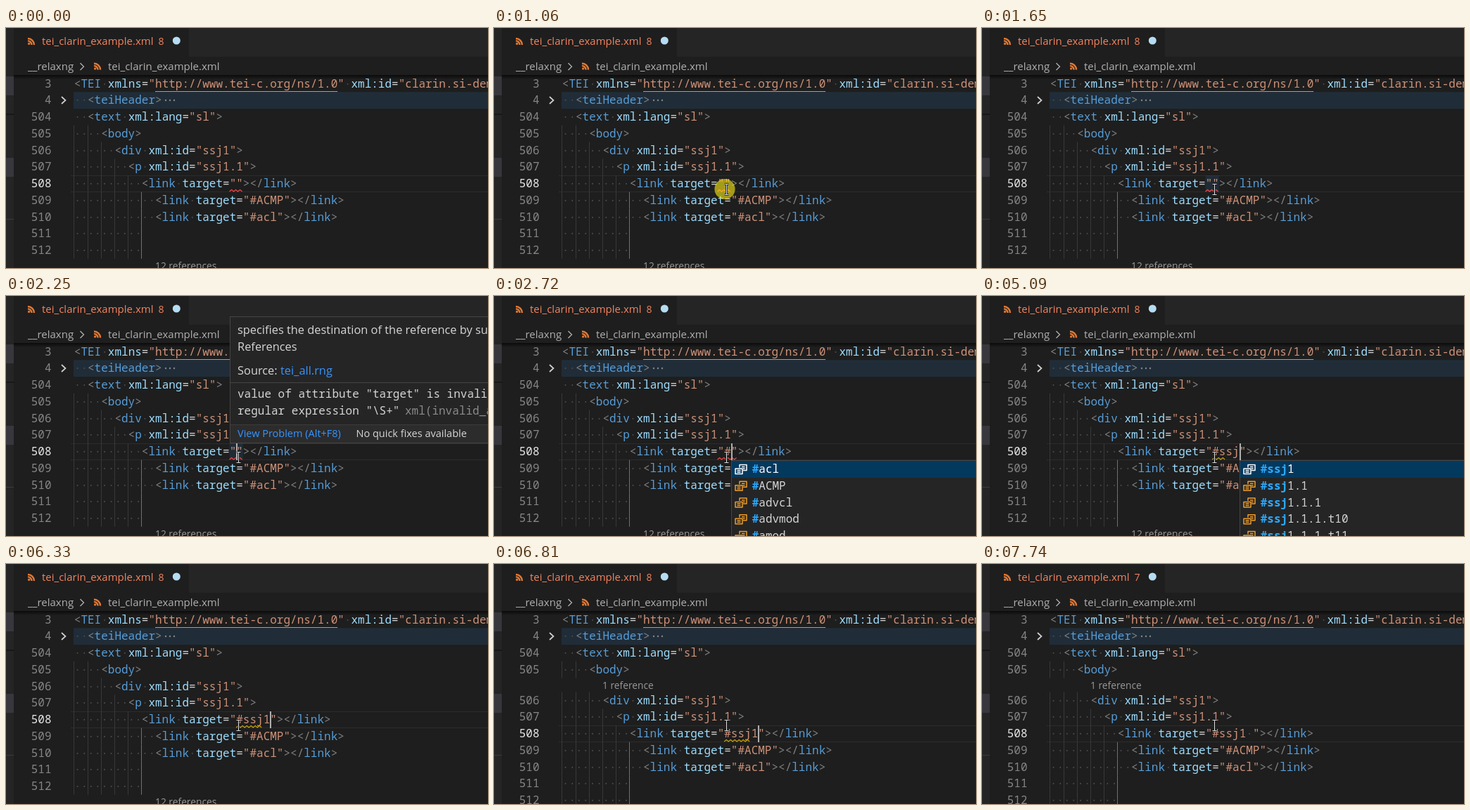
These frames come from a looping animation (685x342 px, 8000 ms). An HTML page:

```html
<!DOCTYPE html>
<html lang="en">
<head>
<meta charset="utf-8">
<title>XML editor</title>
<style>
  html, body { margin: 0; width: 100%; height: 100%; overflow: hidden; background: #1e1e1e; }
  svg { display: block; width: 685px; height: 342px; }
  .code { font: 500 16px "Noto Sans Mono", monospace; fill: #d4d4d4; }
  .ui { font: 15px "Open Sans", sans-serif; fill: #b0b0b0; }
  .doc { font-size: 16.4px; fill: #d6d6d6; }
  .bar { font-size: 14.5px; fill: #d6d6d6; }
  .lens { font-size: 13.8px; fill: #999; }
  .num { text-anchor: end; fill: #858585; }
  .match { fill: #2aaaff; font-weight: 700; }
  .link { fill: #3794ff; }
  .title { fill: #f4845f; }
</style>
</head>
<body>
<svg viewBox="0 0 685 342">
  <defs>
    <linearGradient id="shade" x2="0" y2="1">
      <stop stop-color="#000" stop-opacity=".65"/>
      <stop offset="1" stop-color="#000" stop-opacity="0"/>
    </linearGradient>
    <g id="feed" fill="none" stroke="#e37933" stroke-width="2.4">
      <circle cx="1.6" cy="8.4" r="1.6" fill="#e37933" stroke="none"/>
      <path d="M0 4.4a5.6 5.6 0 0 1 5.6 5.6M0 1a9 9 0 0 1 9 9"/>
    </g>
    <g id="member" fill="none" stroke-width="1.5" stroke-linejoin="round">
      <path d="M7 5V1h10v8h-5M10 4h4.500M12 6.500h2.500"/>
      <path d="M1 6.500h10v7.500h-10zM3.500 9h5M3.500 11.500h5"/>
    </g>
  </defs>

  <rect width="11" height="342" fill="#252526"/>
  <rect y="69" width="11" height="27" fill="#37373d"/>
  <rect y="122" width="11" height="2" fill="#181818"/>
  <rect y="185" width="11" height="27" fill="#37373d"/>
  <rect y="272" width="11" height="1" fill="#3c3c3c"/>
  <g id="editor"></g>

  <rect x="11" width="674" height="67" fill="#1e1e1e"/>
  <rect x="260" width="425" height="41" fill="#252526"/>
  <rect x="11" y="67" width="674" height="6" fill="url(#shade)"/>
  <use href="#feed" x="31" y="14"/>
  <text class="ui title" x="51" y="24">tei_clarin_example.xml</text>
  <text class="ui title" id="errors" x="216.500" y="24" style="font-size:14px"></text>
  <circle cx="242.300" cy="18" r="5.500" fill="#b5dcf3"/>
  <text class="ui" x="31" y="60">__relaxng</text>
  <path d="M105.500 50l5 5-5 5" fill="none" stroke="#b0b0b0" stroke-width="1.3"/>
  <use href="#feed" x="125" y="49.500"/>
  <text class="ui" x="145" y="60">tei_clarin_example.xml</text>

  <g id="overlay"></g>
  <circle id="click" cx="328" cy="229.500" r="14.600" fill="#ffee14" fill-opacity=".6"/>
  <g id="mouse" fill="none">
    <path d="M-3-7.500h2.500l.5.500.500-.500h2.500M0-7v14M-3 7.500h2.500l.5-.500.500.500h2.500" stroke="#111" stroke-width="2.600"/>
    <path d="M-3-7.500h2.500l.5.500.500-.500h2.500M0-7v14M-3 7.500h2.500l.5-.500.500.500h2.500" stroke="#ddd" stroke-width="1.100"/>
  </g>
</svg>

<script>
const LOOP = 8000, CHAR = 9.6, ROW = 23.75, TOP = 67.5, LEFT = 96.8;
const VALUE_X = LEFT + 24 * CHAR;
const RED = '#f14c4c', YELLOW = '#cca700';
const el = id => document.getElementById(id);

const ids = ['#acl', '#ACMP', '#advcl', '#advmod', '#amod', '#skup',
  '#ssj1', '#ssj1.1', '#ssj1.1.1', '#ssj1.1.1.t10', '#ssj1.1.1.t11'];

// Each entry changes part of the state; wave is a column range relative to the value.
const changes = [
  [0, { text: '', caret: 0, wave: [-1, 1], color: RED, errors: 8, click: 0, range: 0, hover: 0, list: 0, lens: 0 }],
  [1060, { click: 1 }],
  [1190, { caret: 1 }],
  [1250, { click: 0 }],
  [1650, { caret: 0, range: 1 }],
  [1860, { hover: 1 }],
  [2250, { caret: 1 }],
  [2660, { text: '#', hover: 0, range: 0, wave: [-1, 2] }],
  [2720, { list: 1 }],
  [3170, { caret: 0, wave: [0, 1], color: YELLOW }],
  [3230, { text: '#s', caret: 1 }],
  [3640, { wave: [0, 2] }],
  [3770, { caret: 0 }],
  [4430, { caret: 1 }],
  [4640, { text: '#ss' }],
  [5090, { text: '#ssj' }],
  [5700, { caret: 0 }],
  [5840, { wave: [0, 4] }],
  [6150, { caret: 1 }],
  [6330, { text: '#ssj1', list: 0 }],
  [6810, { lens: 1 }],
  [7000, { wave: null, caret: 0 }],
  [7140, { errors: 7 }],
  [7270, { text: '#ssj1·', caret: 1 }],
  [7740, { caret: 0 }]
];
let last = {};
const states = changes.map(([at, change]) => [at, last = { ...last, ...change }]);

const rect = (x, y, w, h, fill, more = '') =>
  `<rect x="${x}" y="${y}" width="${w}" height="${h}" fill="${fill}" ${more}/>`;
const text = (x, y, cls, body) => `<text x="${x}" y="${y}" class="${cls}">${body}</text>`;
const tint = (fill, s) => `<tspan fill="${fill}">${s}</tspan>`;
const caretX = value => Math.round(VALUE_X + value.length * CHAR);

function highlight(source) {
  let inTag = false;
  return source.replace(/·+|"[^"]*"|<\/?|[>=]|[\w:]+/g, token => {
    const first = token[0], isName = inTag;
    inTag = first === '<';
    if (first === '·') return tint('#484848', token);
    if (first === '"') return tint('#ce9178', token.replace(/·/g, tint('#484848', '·')));
    if (first === '<' || first === '>') return tint('#808080', token.replace('<', '&lt;'));
    if (first === '=') return token;
    return tint(isName ? '#569cd6' : '#9cdcfe', token);
  });
}

function codeLine(row, number, indent, source, active) {
  const y = TOP + row * ROW, base = y + 17.2;
  let out = '';
  for (let i = 0; i < indent / 2 && row > 2; i++) {
    const bright = i === 5;
    out += rect(Math.floor(LEFT + i * 2 * CHAR), y, 1, ROW, bright ? '#707070' : '#383838');
  }
  return out
    + text(64.5, base, 'code num', active ? tint('#e6e6e6', number) : number)
    + text(LEFT, base, 'code', highlight('·'.repeat(indent) + source));
}

function squiggle([from, to], color) {
  const start = VALUE_X + from * CHAR, end = VALUE_X + to * CHAR;
  let d = `M${start} 233`;
  for (let x = start + 3, up = true; x <= end + .5; x += 3, up = !up) d += `L${x} ${up ? 230.5 : 233}`;
  return `<path d="${d}" fill="none" stroke="${color}" stroke-width="1.2"/>`;
}

function drawEditor(s) {
  const y = 210;
  const upper = rect(96, TOP + ROW, 589, ROW, '#202d39')
    + codeLine(0, 3, 0, '<TEI·xmlns="http://www.tei-c.org/ns/1.0"·xml:id="clarin.si-demo"')
    + rect(LEFT + 12 * CHAR, 90, 27 * CHAR, 1, '#ce9178')
    + codeLine(1, 4, 2, '<teiHeader>')
    + [227, 233, 239].map(x => `<circle cx="${x}" cy="103" r="1.200" fill="#858585"/>`).join('')
    + '<path d="M79 98l5.500 5-5.500 5" fill="none" stroke="#d0d0d0" stroke-width="1.700"/>'
    + codeLine(2, 504, 2, '<text·xml:lang="sl">')
    + codeLine(3, 505, 4, '<body>');
  const lower = rect(92, y, 593, 1, '#2c2c2c') + rect(92, y + 23, 593, 1, '#2c2c2c')
    + (s.range ? rect(VALUE_X - CHAR, y, 2 * CHAR, ROW, '#264f78', 'opacity=".25"') : '')
    + codeLine(4, 506, 6, '<div·xml:id="ssj1">')
    + codeLine(5, 507, 8, '<p·xml:id="ssj1.1">')
    + codeLine(6, 508, 10, `<link·target="${s.text}"></link>`, true)
    + codeLine(7, 509, 12, '<link·target="#ACMP"></link>')
    + codeLine(8, 510, 12, '<link·target="#acl"></link>')
    + codeLine(9, 511, 10, '') + codeLine(10, 512, 10, '')
    + rect(192, TOP + 9 * ROW, 1, 2 * ROW, '#707070')
    + text(212, 343.5, 'ui lens', '12 references')
    + (s.wave ? squiggle(s.wave, s.color) : '')
    + (s.caret ? rect(caretX(s.text), y, 2, 24, '#aeafad') : '');
  return upper + (s.lens ? text(154, 178, 'ui lens', '1 reference') : '')
    + `<g transform="translate(0 ${s.lens ? 20 : 0})">${lower}</g>`;
}

function drawHover() {
  return rect(318.5, 29.5, 400, 180, '#252526', 'stroke="#454545"')
    + rect(319, 184, 366, 25, '#2c2c2d')
    + rect(319, 123, 366, 1, '#454545') + rect(319, 183, 366, 1, '#3c3c3c')
    + text(329, 54, 'ui doc', 'specifies the destination of the reference by supplying')
    + text(329, 78, 'ui doc', 'References')
    + text(329, 112, 'ui doc', 'Source: <tspan class="link">tei_all.rng</tspan>')
    + text(329, 145, 'code', 'value of attribute "target" is invalid;')
    + text(329, 169, 'code', 'regular expression "\\S+"')
    + text(567, 169, 'code', tint('#8a8a8a', 'xml(invalid_attr)'))
    + text(329, 201, 'ui bar', '<tspan class="link">View Problem (Alt+F8)</tspan>')
    + text(497.5, 201, 'ui bar', 'No quick fixes available');
}

function drawList(typed) {
  const x = caretX(typed) + .5, n = typed.length;
  const items = ids.filter(id => id.startsWith(typed)).slice(0, 5);
  return rect(x, 234.5, 430, 140, '#252526', 'stroke="#454545"')
    + rect(x + .5, 235, 429, 24, '#04395e')
    + items.map((id, i) => {
      const y = 235 + i * ROW;
      return `<use href="#member" x="${x + 4.5}" y="${y + 4.5}" stroke="${i ? '#ee9d28' : '#fff'}"/>`
        + text(x + 29.2, y + 17, 'code',
          `<tspan class="match">${id.slice(0, n)}</tspan>` + tint(i ? '#d4d4d4' : '#fff', id.slice(n)));
    }).join('');
}

function moveMouse(t) {
  const step = Math.max(0, Math.min(9, Math.floor((t - 150) / 63.3)));
  const left = (1 - step / 9) ** 2;
  el('mouse').setAttribute('transform', `translate(${330.5 + 177 * left} ${230 + 73 * left})`);
  el('mouse').setAttribute('visibility', t < 150 ? 'hidden' : 'visible');
}

let shown = null;
const start = performance.now();
function frame() {
  const t = (performance.now() - start) % LOOP;
  const state = states.filter(([at]) => at <= t).pop()[1];
  if (state !== shown) {
    shown = state;
    el('editor').innerHTML = drawEditor(state);
    el('overlay').innerHTML = (state.hover ? drawHover() : '') + (state.list ? drawList(state.text) : '');
    el('errors').textContent = state.errors;
    el('click').setAttribute('visibility', state.click ? 'visible' : 'hidden');
  }
  moveMouse(t);
  requestAnimationFrame(frame);
}
frame();
</script>
</body>
</html>
```
